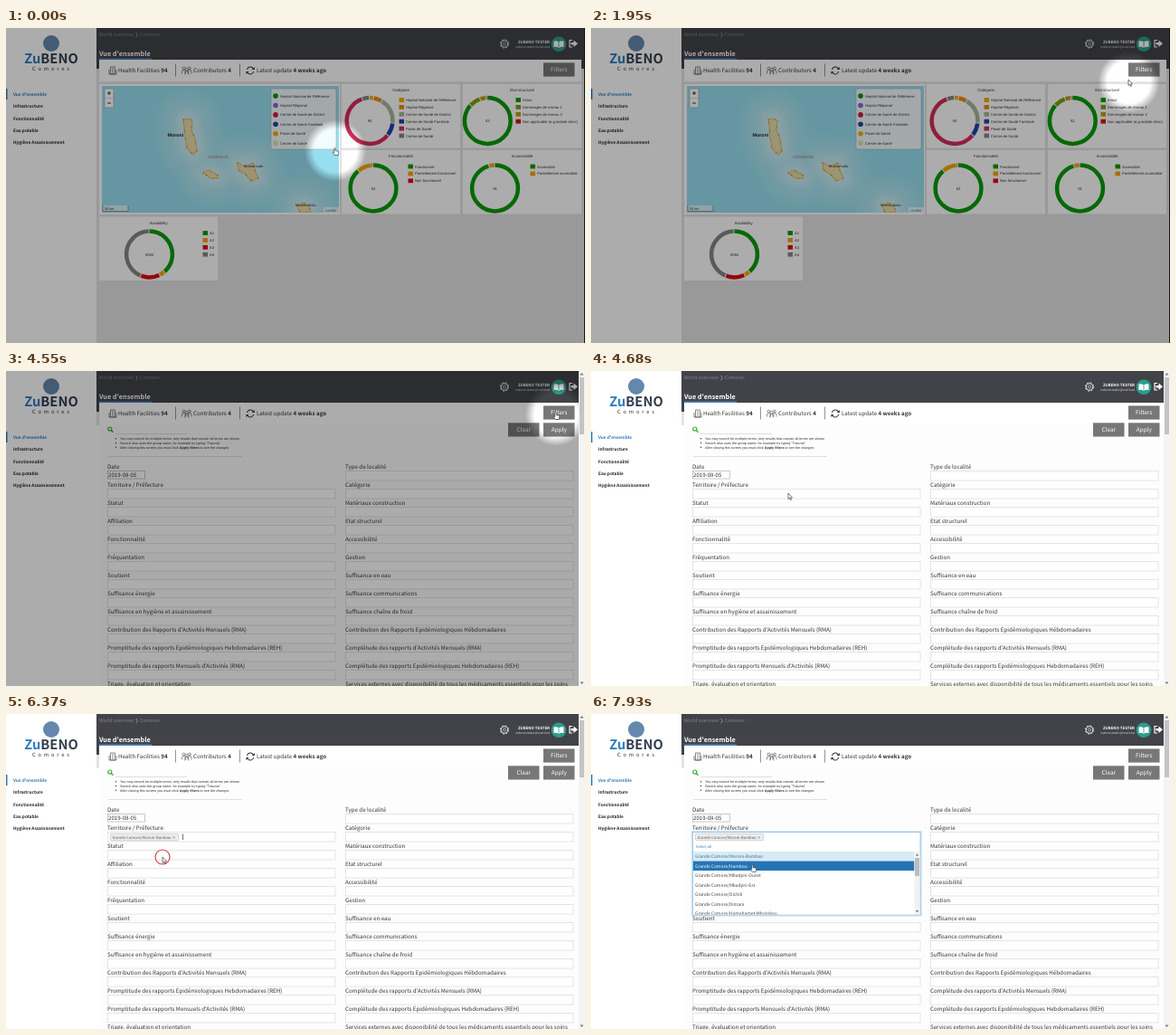
These frames come from a looping animation (640 px wide and 348 px high, 8000 ms). An HTML page:

```html
<!DOCTYPE html>
<html lang="fr">
<head>
<meta charset="utf-8">
<style>
  html, body { margin: 0; height: 100%; overflow: hidden; background: #fff; }
  svg { display: block; width: 100vw; height: 100vh; }
  text {
    font-family: "Noto Sans CJK SC", "Noto Sans CJK JP", "Noto Sans CJK", "Noto Sans", sans-serif;
    text-rendering: geometricPrecision; white-space: pre;
  }
  .small text { font-family: "Liberation Sans", Arial, sans-serif; }
  .bold, tspan { font-weight: 700; }
</style>
</head>
<body>
<svg id="stage" viewBox="0 0 640 348" preserveAspectRatio="none"></svg>
<script>
const rect = (x, y, w, h, fill, extra = '') =>
  `<rect x="${x}" y="${y}" width="${w}" height="${h}" fill="${fill}" ${extra}/>`;
const text = (x, y, size, str, fill = '#333', extra = '') =>
  `<text x="${x}" y="${y}" font-size="${size}" fill="${fill}" ${extra}>${str}</text>`;
const line = (d, color, width = 1, extra = '') =>
  `<path d="${d}" fill="none" stroke="${color}" stroke-width="${width}" ${extra}/>`;
const disc = (x, y, r, fill, extra = '') =>
  `<circle cx="${x}" cy="${y}" r="${r}" fill="${fill}" ${extra}/>`;
const group = (id, body, extra = '') => `<g id="${id}" ${extra}>${body}</g>`;
const middle = 'text-anchor="middle"', end = 'text-anchor="end"', bold = 'class="bold"';

const GREEN = '#0a9b0a', AMBER = '#f2a900', RED = '#e00914', GREY = '#868686';

function sidebar() {
  const items = ["Vue d'ensemble", 'Infrastructure', 'Fonctionnalité', 'Eau potable', 'Hygiène Assainissement'];
  return rect(0, 0, 100, 348, '#fff') + disc(50, 17, 9, '#6488ad') +
    text(50, 39, 14.7, '<tspan fill="#2c7dc1">Zu</tspan>BENO', '#333d4d', `${middle} ${bold}`) +
    text(29, 46.5, 5.8, 'Comores', '#333', 'letter-spacing="2.8"') +
    rect(0, 67, 1.5, 12, '#2c7dc1') +
    items.map((s, i) => text(8, 74.8 + 13.4 * i, 4.75, s, i ? '#222' : '#2c7dc1', bold)).join('');
}

function header() {
  const person = (x, y) => line(`M${x - 2} ${y + 4}v-2q0-2 2-2t2 2v2`, '#444', .6) +
    disc(x, y - 2, 1.4, 'none', 'stroke="#444" stroke-width=".6"');
  return rect(100, 0, 540, 45, '#424349') + rect(100, 45, 540, 15, '#e3e3e4') +
    text(103, 8.7, 5.25, 'World overview ❯ Comores', '#85868a') +
    text(103, 31.4, 7.3, "Vue d'ensemble", '#fff', bold) + rect(103, 33.5, 58, 1.3, '#4e92d0') +
    disc(551, 17.5, 3.7, 'none', 'stroke="#ddd" stroke-width="1.1"') +
    disc(551, 17.5, 4.7, 'none', 'stroke="#ddd" stroke-width="1" stroke-dasharray="1.8 1.9"') +
    disc(551, 17.5, 1.5, 'none', 'stroke="#ddd" stroke-width=".7"') +
    text(601, 17, 4.3, 'ZUBENO TESTER', '#fff', `${end} ${bold}`) +
    text(601, 22.3, 3.35, 'zubeno.tester@mail.test', '#ddd', end) +
    disc(611, 17.8, 8.3, '#2b9d8c') +
    '<path d="M605.5 14.5q3-1 5.5 1q2.5-2 5.5-1v6.5q-3-1-5.5 1q-2.5-2-5.5-1z" fill="#fff"/>' +
    line('M611 15.5v6', '#2b7d78', .7) +
    line('M626 13.5h-3v7.5h3', '#fff', 1.2) +
    '<path d="M624.5 16h3v-2.5l4.5 3.8-4.5 3.8v-2.5h-3z" fill="#fff"/>' +
    rect(103, 35, 533, 24.5, '#fff') +
    line('M115.5 51v-8h5v8zM114 51h8M117 45h2M117 47h2M117 49h2M114 46v5M122 46v5', '#555', .7) +
    person(196.5, 46.5) + person(203, 46.5) + person(199.8, 47.5) +
    line('M266.5 46a3.7 3.7 0 0 1 6.8-1.2M273.7 48a3.7 3.7 0 0 1-6.8 1.2', '#333', 1.1) +
    '<path d="M274.8 43v3h-3zM265.4 51v-3h3z" fill="#333"/>' +
    text(124, 49.3, 6.2, 'Health Facilities <tspan>94</tspan>') +
    text(207, 49.3, 6.2, 'Contributors <tspan>4</tspan>') +
    text(277, 49.3, 6.15, 'Latest update <tspan>4 weeks ago</tspan>') +
    line('M187.5 39.5v14M258.5 39.5v14', '#666', .7);
}

const button = (x, y, label) => rect(x, y, 34.5, 15.2, '#777') + text(x + 17.3, y + 9.7, 6.4, label, '#fff', middle);

function map() {
  const islands = 'M196 101L203 100 206 103 205 113 209 122 211 136 207 140 200 133 198 120 197 110Z' +
    'M218 160L224 157 235 163 234 166 226 166Z' +
    'M256 149L265 153 273 149 275 157 279 166 271 169 265 162 257 157Z' +
    'M322 196L329 193 335 197 337 204 325 204Z';
  const types = [['#0a8f1c', 'Hopital National de Référence'], ['#8567d6', 'Hopital Régional'],
    ['#d3173f', 'Centre de Santé de District'], ['#1f43b5', 'Centre de Santé Familiale'],
    ['#e8b400', 'Poste de Santé'], ['#dcdcc0', 'Centre de Santé']];
  const halo = (w, c) => line(islands, c, w, 'stroke-linejoin="round" filter="url(#soft)"');
  return rect(103, 62, 266, 144, '#fff') +
    `<g clip-path="url(#mapArea)">${rect(106, 64, 262, 140, '#97dff0')}
     ${halo(58, '#a6e3f1')}${halo(30, '#b6e7f2')}${halo(12, '#cfeef4')}
     <path d="${islands}" fill="#e6dcae"/>
     ${line(islands, '#dfae2c', 1.6, 'stroke-dasharray="0 2.2" stroke-linecap="round"')}
     ${line(islands, '#c9562f', 1.1, 'stroke-dasharray="0 9" stroke-linecap="round"')}</g>` +
    text(178.5, 120.3, 5.3, 'Moroni', '#222', bold) + text(223, 143.5, 4.3, 'COMOROS', '#a06a72') +
    text(263, 153.8, 4.1, 'Mutsamudu') + text(320, 196.8, 4.1, 'Mamoudzou') +
    rect(109, 67, 10, 21, '#fff', 'rx="1" stroke="#999" stroke-width=".6"') +
    line('M109 77.5h10', '#bbb', .5) + line('M112 72h4M114 70v4M112 83h4', '#222', .9) +
    rect(107, 196, 28, 6.5, '#fff', 'opacity=".6"') + line('M107 196v6.5h28v-6.5', '#666', .6) +
    text(109, 201, 3.8, '50 km') +
    rect(351, 198, 17, 6, '#fff', 'opacity=".7"') + text(353, 202.7, 4, 'Leaflet', '#2878a8') +
    rect(293, 67, 72, 67, '#fff', 'rx="2" opacity=".88" stroke="#aaa" stroke-width=".6"') +
    types.map(([c, s], i) => disc(298, 75.1 + 10.4 * i, 2.8, c) + text(303, 76.6 + 10.4 * i, 4.1, s)).join('');
}

// items: [colour, label, percent]
function donutCard(x, y, title, total, cx, cy, lx, ly, items) {
  let start = 0;
  const arcs = items.map(([color, , share]) => {
    const arc = disc(cx, cy, 25.4, 'none', `stroke="${color}" stroke-width="4.5" pathLength="100"
      stroke-dasharray="${share - .6} 100" stroke-dashoffset="${-start}" transform="rotate(-90 ${cx} ${cy})"`);
    start += share;
    return arc;
  }).join('');
  const legend = items.map(([color, label], i) =>
    rect(lx - .5, ly - 2.4 + 7.9 * i, 5.5, 4.8, color) + text(lx + 7, ly + 1.5 + 7.9 * i, 4.15, label)).join('');
  return rect(x, y, 131, 70.5, '#fff') + text(x + 65.5, y + 8, 4.3, title, '#333', middle) +
    arcs + text(cx, cy + 1.5, 4.2, total, '#333', middle) + legend;
}

function dashboard() {
  return rect(100, 59.5, 540, 289, '#e3e3e4') + rect(639, 0, 1, 348, '#222') + map() +
    donutCard(371, 62, 'Catégorie', '94', 402, 102.5, 435, 79.5, [
      [AMBER, 'Hopital National de Référence', 3], ['#ed8b12', 'Hopital Régional', 6],
      ['#a7b79f', 'Centre de Santé de District', 18], ['#2343a8', 'Centre de Santé Familiale', 9],
      ['#d62d5c', 'Poste de Santé', 59], [GREY, 'Centre de Santé', 5]]) +
    donutCard(505, 62, 'Etat structurel', '52', 532.3, 102.5, 564, 79.5, [
      [GREEN, 'Intact', 87], ['#7ba010', 'Dommages de niveau 1', 8],
      ['#b8a010', 'Dommages de niveau 2', 4], [RED, 'Non applicable (e.g mobile clinic)', 1]]) +
    donutCard(371, 135, 'Fonctionnalité', '52', 406, 177, 445, 153, [
      [GREEN, 'Fonctionnel', 89], [AMBER, 'Partiellement fonctionnel', 10], [RED, 'Non fonctionnel', 1]]) +
    donutCard(505, 135, 'Accessibilité', '91', 540.5, 177, 580, 153, [
      [GREEN, 'Accessible', 96], [AMBER, 'Partiellement accessible', 4]]) +
    donutCard(103, 208.5, 'Availability', '5594', 158.5, 250, 218, 226.5, [
      [GREEN, 'A1', 39], [AMBER, 'A2', 4], [RED, 'A3', 13.5], [GREY, 'A4', 43.5]]);
}

function filterPanel() {
  const columns = [[112, ['Date', 'Territoire / Préfecture', 'Statut', 'Affiliation', 'Fonctionnalité',
    'Fréquentation', 'Soutient', 'Suffisance énergie', 'Suffisance en hygiène et assainissement',
    "Contribution des Rapports d'Activités Mensuels (RMA)",
    'Promptitude des rapports Epidémiologiques Hebdomadaires (REH)',
    "Promptitude des rapports Mensuels d'Activités (RMA)", 'Triage, évaluation et orientation']],
  [375, ['Type de localité', 'Catégorie', 'Matériaux construction', 'Etat structurel', 'Accessibilité',
    'Gestion', 'Suffisance en eau', 'Suffisance communications', 'Suffisance chaîne de froid',
    'Contribution des Rapports Epidémiologiques Hébdomadaires',
    "Complétude des rapports d'Activités Mensuels (RMA)",
    'Complétude des rapports Epidémiologiques Hebdomadaires (REH)',
    'Services externes avec disponibilité de tous les médicaments essentiels pour les soins']]];
  const hints = ['You may search for multiple terms, only results that contain all terms are shown',
    'Search also uses the group name, for example try typing "Trauma"',
    'After closing this screen you must click <tspan>Apply filters</tspan> to see the changes'];
  const fields = columns.map(([x, labels]) => labels.map((label, i) => {
    const y = 106 + 20 * i, date = label === 'Date';
    return rect(x + .5, y + 4.5, date ? 41 : 251.5, date ? 8.5 : 10.5, '#fff',
      `stroke="${date ? '#bbb' : '#dedede'}" stroke-width=".8"`) + text(x, y + 2.2, 6.2, label);
  }).join('')).join('');
  return rect(103, 59, 530, 289, '#fdfdfd') + button(555, 57.3, 'Clear') + button(594, 57.3, 'Apply') +
    disc(114.8, 64, 2, 'none', 'stroke="#35b22e" stroke-width="1.2"') + line('M116.3 65.5l2.2 2.2', '#35b22e', 1.4) +
    line('M121 69.5h79M113 94.5h148', '#ccc', .6) +
    `<g class="small">${hints.map((s, i) => disc(121.5, 74.7 + 4.8 * i, .7, '#333') +
      text(126, 76 + 4.8 * i, 3.78, s)).join('')}</g>` +
    fields + text(113, 117, 6.1, '2019-08-05') +
    rect(633, 0, 7, 348, '#f4f4f4') + rect(634, 7, 5, 63, '#c4c4c4') +
    '<path d="M634.5 4.5h4l-2-2.5zM634.5 343.5h4l-2 2.5z" fill="#777"/>';
}

function dropdown() {
  const places = ['Moroni-Bambao', 'Hambou', 'Mbadjini-Ouest', 'Mbadjini-Est', 'Oichili', 'Dimani', 'Hamahamet-Mboinkou'];
  return rect(112, 130.3, 252.5, 92, '#fff', 'stroke="#66afe9" stroke-width="2.5" opacity=".3"') +
    rect(112.5, 130.5, 251.5, 91.5, '#fff', 'stroke="#8fbfe4" stroke-width=".8"') +
    text(116, 148.3, 4.1, 'Select all', '#337ab7') +
    `<g clip-path="url(#list)">${places.map((p, i) =>
      rect(113, 152 + 10.5 * i, 244.5, 10.5, '#fff', `id="row${i}"`) +
      text(115, 159 + 10.5 * i, 4.93, 'Grande Comore/' + p, '#444', `id="label${i}"`)).join('')}</g>` +
    rect(357.5, 152, 6, 69.5, '#f1f1f1') + rect(358, 159, 5, 20, '#bdbdbd') +
    '<path d="M358.8 156.5h3.4l-1.7-2zM358.8 217h3.4l-1.7 2z" fill="#666"/>';
}

const stage = document.getElementById('stage');
stage.innerHTML = `<defs>
    <filter id="soft" x="-50%" y="-50%" width="200%" height="200%"><feGaussianBlur stdDeviation="4"/></filter>
    <clipPath id="mapArea">${rect(106, 64, 262, 140, '#000')}</clipPath>
    <clipPath id="list">${rect(112, 152, 252, 69.5, '#000')}</clipPath>
    <radialGradient id="glow"><stop offset=".7"/><stop offset="1" stop-opacity="0"/></radialGradient>
    <mask id="hole" maskUnits="userSpaceOnUse" x="0" y="0" width="640" height="348">
      ${rect(0, 0, 640, 348, '#fff')}${disc(0, 0, 34, 'url(#glow)', 'id="spot"')}</mask>
  </defs>` +
  sidebar() + header() + group('dashboard', dashboard(), 'class="small"') + group('panel', filterPanel()) +
  button(594, 38.4, 'Filters') + group('dropdown', dropdown()) +
  group('tag', rect(115.5, 132.3, 75, 7.4, '#eee', 'rx="1" stroke="#bbb" stroke-width=".6"') +
    text(117.5, 137.7, 4.28, 'Grande Comore/Moroni-Bambao ×', '#555')) +
  group('caret', line('M195.5 132.5v6.5', '#333', .7)) +
  group('dim', rect(0, 0, 640, 348, '#000', 'id="shade" opacity=".32" mask="url(#hole)"')) +
  disc(0, 0, 8, 'none', 'id="ring" stroke="#dc3c58" stroke-width="1.2"') +
  group('cursor', `<path id="arrow" d="M0 0V6.5L1.5 5.2 2.5 7.5 3.5 7.1 2.5 4.9H4.5Z"/>
    <path id="hand" d="M-.7 0q.7-.8 1.4 0v2.5l3 .8q.8.3.6 1.2l-.6 3h-3.900l-2.3-3q.3-.9 1.8.2z"/>`,
    'fill="#fff" stroke="#222" stroke-width=".6"');

// Pointer tip: [time, x, y]
const pointer = [[0, 363.5, 133], [780, 363.5, 133], [1690, 556, 78], [1950, 594, 57], [2340, 603, 46],
  [2470, 603, 46], [2730, 604, 45], [2860, 604, 45], [3250, 608, 45], [4290, 608, 45], [4550, 607.5, 46],
  [4680, 218, 135], [4810, 196, 136], [4940, 196, 136], [5200, 182, 137], [5330, 182, 137],
  [5850, 176, 156], [6110, 173, 158], [6500, 173, 158], [7020, 185, 137], [7540, 185, 137], [7930, 178.5, 167]];
// Click rings: [from, until, x, y, first radius, last radius]
const clicks = [[3510, 3770, 611, 47, 9, 11], [5070, 5330, 185, 137, 8, 10],
  [6110, 6630, 173, 158, 7, 9], [6760, 7150, 185, 137, 7, 9]];

const $ = id => document.getElementById(id);
const show = (id, on) => $(id).setAttribute('display', on ? 'inline' : 'none');
const place = (id, x, y) => $(id).setAttribute('transform', `translate(${x} ${y})`);

function pointerAt(t) {
  const i = pointer.findIndex(k => k[0] > t);
  if (i < 0) return pointer.at(-1).slice(1);
  const [t0, x0, y0] = pointer[i - 1], [t1, x1, y1] = pointer[i], k = (t - t0) / (t1 - t0);
  return [x0 + (x1 - x0) * k, y0 + (y1 - y0) * k];
}

function draw(now) {
  const t = Math.floor(now % 8000 / 130) * 130;
  const [x, y] = pointerAt(t);
  const panel = t >= 3770, open = t >= 5330 && t < 6370 || t >= 7280, tag = t >= 5980;
  show('dashboard', !panel);
  show('panel', panel);
  show('dropdown', open);
  show('tag', tag);
  show('caret', t >= 6370 && !open);
  show('dim', t < 4680);
  // The scrollbar of the filter panel stays bright.
  $('shade').setAttribute('width', panel ? 633 : 640);

  const hot = t >= 7800 ? 1 : 0;
  for (const i of [0, 1]) {
    const chosen = i === 0 && tag;
    $('row' + i).setAttribute('fill', i === hot ? '#2475b5' : chosen ? '#d8ebf6' : '#fff');
    $('label' + i).setAttribute('fill', i === hot ? '#fff' : chosen ? '#3c6f96' : '#444');
  }

  place('spot', x + .5, y + 2.5);
  place('cursor', x, y);
  const hand = t < 910 || t >= 2340 && t < 4680 || open && y > 150;
  show('hand', hand);
  show('arrow', !hand);

  const click = clicks.find(([from, until]) => t >= from && t < until);
  show('ring', click);
  if (click) {
    const [from, until, cx, cy, r0, r1] = click;
    place('ring', cx, cy);
    $('ring').setAttribute('r', r0 + (r1 - r0) * (t - from) / (until - from));
  }
}

const begin = performance.now();
(function loop() {
  draw(performance.now() - begin);
  requestAnimationFrame(loop);
})();
</script>
</body>
</html>
```
